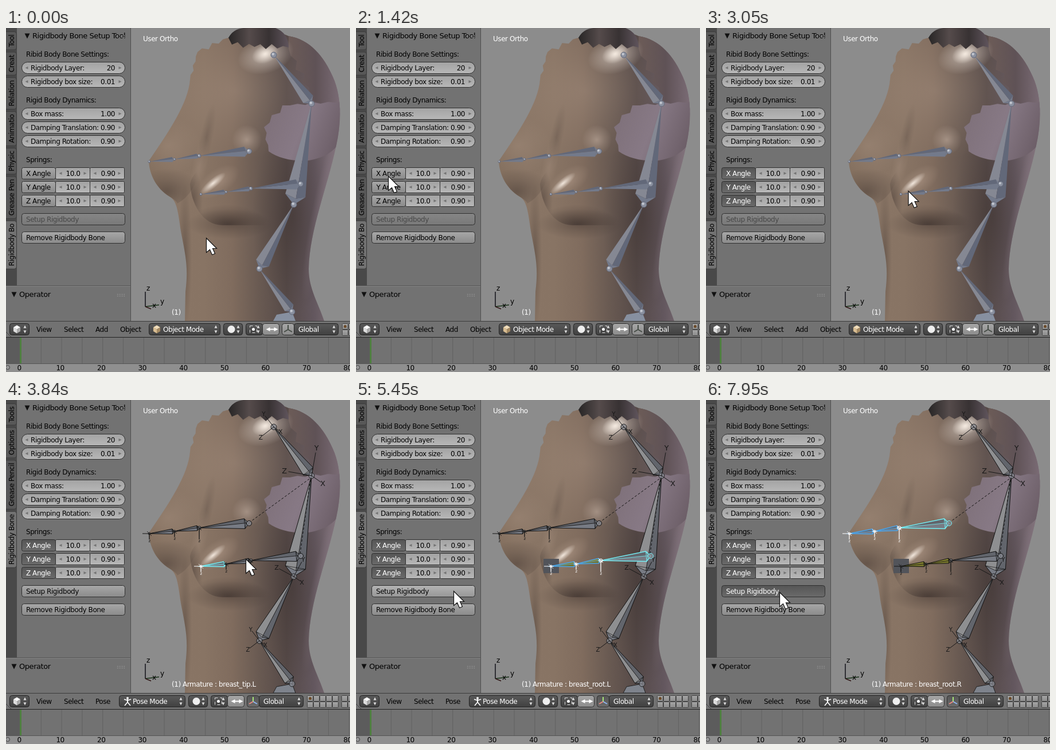
An HTML page with a canvas for the animation above (8 s loop, 600 px wide and 600 px high).

```html
<!DOCTYPE html>
<html>
<head>
<meta charset="utf-8">
<style>
html, body { margin: 0; width: 100%; height: 100%; overflow: hidden; background: #727272; }
canvas { display: block; }
</style>
</head>
<body>
<canvas id="stage" width="600" height="600"></canvas>
<script>
const ctx = document.getElementById('stage').getContext('2d');
const LOOP = 8000, POSE_AT = 3360, PRESS_AT = 5300, SETUP_AT = 5450, PRESS_AGAIN_AT = 7950;

// pointer moves: start, end, x, y
const moves = [
  [375, 420, 349, 365], [605, 880, 115, 339], [880, 1420, 56, 258], [1640, 1780, 58, 280],
  [1870, 2000, 60, 301], [2495, 3230, 371, 283], [3600, 3840, 418, 277], [4155, 4330, 448, 276],
  [4715, 5040, 170, 333], [5500, 6040, 275, 224], [6325, 6500, 315, 218], [6835, 7010, 377, 220],
  [7425, 7750, 128, 335]
];

// each bone runs from a base joint back to a tip joint
const link = joints => joints.slice(1).map((base, i) => ({ tip: joints[i], base }));
const spine = link([[467, 47], [533, 132], [502, 308], [442, 420], [499, 495]]);
const chain = [[250, 233], [294, 229], [337, 223], [424, 215]];
const parts = ['tip', 'mid', 'root'];
const chest = [['R', 0, 0], ['L', 90, 57]].flatMap(([side, dx, dy]) =>
  link(chain.map(([x, y]) => [x + dx, y + dy])).map((b, i) => ({ ...b, part: parts[i], name: `${parts[i]}.${side}` })));
const picks = [['L', 3560, 460], ['R', 6150, 545]].flatMap(([side, start, gap]) =>
  parts.map((part, i) => ({ at: start + i * gap, name: `${part}.${side}` })));

// jagged path segment
function torn(x0, y0, x1, y1, steps, depth) {
  const len = Math.hypot(x1 - x0, y1 - y0), nx = (y0 - y1) / len, ny = (x1 - x0) / len;
  let d = '';
  for (let i = 1; i < steps; i++) {
    const k = i / steps, off = depth * (i % 2 ? 1 : -1) * (.7 + .3 * Math.sin(i * 5));
    d += `L${x0 + (x1 - x0) * k + nx * off} ${y0 + (y1 - y0) * k + ny * off}`;
  }
  return d + `L${x1} ${y1}`;
}
const body = new Path2D(`M388 17${torn(388, 17, 334, 42, 6, 4)}${torn(334, 42, 321, 90, 6, 2)}` +
  'C318 130 285 180 249 232C250 255 262 280 285 294C300 302 300 325 306 360C314 400 318 420 313 460' +
  'L312 511H555C545 480 528 455 528 420C530 350 560 280 576 205C585 165 586 120 570 85C555 50 530 20 493 14' +
  'C455 -2 420 -2 388 17Z');
const back = new Path2D(`M493 0V36${torn(493, 36, 538, 128, 8, 6)}L600 150V0Z`);
const shoulder = new Path2D(`M482 135${torn(482, 135, 588, 128, 8, 2)}L578 205Q560 228 520 232` +
  `Q480 231 458 215${torn(458, 215, 450, 173, 4, 3)}${torn(450, 173, 482, 135, 4, 6)}Z`);
const collar = new Path2D(`M388 17Q396 2 414 0H470Q492 8 493 34${torn(493, 34, 394, 29, 10, 5)}Z`);
const farBreast = new Path2D('M322 104C308 140 285 180 249 232C250 255 262 280 285 294Q296 300 299 306Q330 290 342 235Z');
const nearBreast = new Path2D('M364 224Q325 250 321 272C323 305 342 344 378 344H470V190Z');

function text(s, x, y, { color = '#000', size = 12, align = 'left' } = {}) {
  ctx.font = `${size}px "DejaVu Sans", sans-serif`;
  ctx.letterSpacing = '-0.45px';
  ctx.textAlign = align;
  ctx.fillStyle = color;
  ctx.fillText(s, x, y);
}
function rect(x, y, w, h, color) {
  ctx.fillStyle = color;
  ctx.fillRect(x, y, w, h);
}
function poly(points, fill, stroke, width = 1) {
  ctx.beginPath();
  points.forEach(p => ctx.lineTo(...p));
  ctx.closePath();
  if (fill) { ctx.fillStyle = fill; ctx.fill(); }
  if (stroke) { ctx.strokeStyle = stroke; ctx.lineWidth = width; ctx.stroke(); }
}
// triangle pointing along +x (dir 0), +y (1), -x (2) or -y (3)
function triangle(x, y, r, dir, color) {
  const a = dir * Math.PI / 2, c = Math.cos(a), s = Math.sin(a);
  poly([[r, 0], [-r, r], [-r, -r]].map(([u, v]) => [x + u * c - v * s, y + u * s + v * c]), color);
}
function line(x1, y1, x2, y2, color = '#111', width = 1) {
  ctx.strokeStyle = color;
  ctx.lineWidth = width;
  ctx.beginPath();
  ctx.moveTo(x1, y1);
  ctx.lineTo(x2, y2);
  ctx.stroke();
}
function disc(x, y, r, fill, stroke) {
  ctx.beginPath();
  ctx.arc(x, y, r, 0, 7);
  ctx.fillStyle = fill;
  ctx.fill();
  if (stroke) { ctx.strokeStyle = stroke; ctx.lineWidth = 1; ctx.stroke(); }
}
function shade(x0, y0, x1, y1, ...colors) {
  const g = ctx.createLinearGradient(x0, y0, x1, y1);
  colors.forEach((c, i) => g.addColorStop(i / (colors.length - 1), c));
  return g;
}
const RAISED = ['#a8a8a8', '#8a8a8a'], HOVER = ['#b4b4b4', '#969696'], PRESSED = ['#555', '#6b6b6b'],
  DISABLED = ['#868686', '#787878'], NUMBER = ['#a2a2a2', '#b8b8b8'], MENU = ['#5a5a5a', '#404040'];
function box(x, y, w, h, r, [top, bottom], edge = '#303030') {
  ctx.beginPath();
  ctx.roundRect(x + .5, y + .5, w - 1, h - 1, r);
  ctx.fillStyle = shade(0, y, 0, y + h, top, bottom);
  ctx.fill();
  ctx.strokeStyle = edge;
  ctx.lineWidth = 1;
  ctx.stroke();
}
// soft elliptical tint, colour given as "r,g,b"
function glow(x, y, rx, ry, rgb, alpha, turn = 0) {
  ctx.save();
  ctx.translate(x, y);
  ctx.rotate(turn);
  ctx.scale(rx, ry);
  const g = ctx.createRadialGradient(0, 0, 0, 0, 0, 1);
  [1, .45, 0].forEach((k, i) => g.addColorStop(i / 2, `rgba(${rgb},${alpha * k})`));
  ctx.fillStyle = g;
  ctx.fillRect(-1, -1, 2, 2);
  ctx.restore();
}
function clipped(path, draw) {
  ctx.save();
  ctx.clip(path);
  draw();
  ctx.restore();
}

function drawTorso() {
  const dark = '52,42,39', light = '178,155,138', white = '250,240,230';
  clipped(body, () => {
    rect(218, 0, 382, 511, shade(250, 0, 585, 0, '#84705f', '#897565', '#887464', '#806c5e',
      '#695a52', '#564a48', '#63575e', '#84757e'));
    glow(400, 110, 150, 120, light, .35);
    glow(500, 330, 70, 170, dark, .4);
    glow(553, 320, 20, 160, '150,133,145', .5, .2);
    glow(312, 400, 12, 130, dark, .35);
    glow(350, 190, 11, 60, dark, .2, .2);
    glow(338, 240, 13, 50, light, .3, .2);
    clipped(farBreast, () => {
      glow(283, 205, 60, 50, light, .3);
      glow(280, 285, 60, 40, dark, .4);
    });
    glow(390, 342, 75, 26, dark, .4);
    clipped(nearBreast, () => {
      glow(325, 300, 18, 55, dark, .4);
      glow(385, 342, 70, 34, dark, .5);
      glow(370, 268, 42, 22, light, .6, -.6);
      glow(361, 271, 28, 8, white, .9, -.7);
    });
    glow(420, 195, 26, 26, '215,195,180', .45);
    ctx.fillStyle = shade(495, 0, 585, 0, '#6b5b57', '#5f5256', '#7c6d77');
    ctx.fill(back);
    glow(453, 47, 50, 32, white, .6, -.3);
    glow(452, 45, 24, 16, white, .9, -.4);
    ctx.fillStyle = shade(450, 150, 580, 200, '#7e7079', '#877985', '#6c5e67');
    ctx.fill(shoulder);
  });
  ctx.fillStyle = shade(390, 0, 493, 0, '#2a2828', '#554b4b', '#383233', '#5f545c');
  ctx.fill(collar);
}

function drawBone({ tip, base }, pose, edge, yellow) {
  const dx = tip[0] - base[0], dy = tip[1] - base[1];
  const at = (along, across) => [base[0] + dx * along - dy * across, base[1] + dy * along + dx * across];
  const left = at(.09, -.1), right = at(.09, .1), ridge = at(.06, .01);
  const steep = Math.abs(dy) > Math.abs(dx);
  const [lit, mid, low] = yellow ? ['#99983a', '#85842f', '#74732c']
    : pose ? ['#8e8f91', '#62656c', '#777b84'] : ['#858893', '#626879', '#737a8b'];
  poly([tip, left, ridge], steep ? lit : low);
  poly([tip, ridge, right], mid);
  poly([left, base, right, ridge], low);
  if (!pose) return;
  poly([tip, left, base, right], null, edge, edge === '#111' ? 1 : 1.5);
  line(...tip, ...ridge, edge, .8);
  poly([left, ridge, right], null, edge, .7);
}
function drawJoint([x, y], r, pose, edge = '#222') {
  disc(x, y, r, pose ? 'rgba(135,138,145,.75)' : '#8a909f', pose ? edge : '#626879');
  if (!pose) disc(x - r * .25, y - r * .3, r * .45, '#c1c5ce');
}
function drawAxes({ tip: [x, y], base }) {
  const dx = (x - base[0]) * .27, dy = (y - base[1]) * .27, len = Math.hypot(dx, dy);
  for (const [name, u, v] of [['Y', dx, dy], ['Z', dy, -dx], ['X', len * .4, len * .28]]) {
    line(x, y, x + u * .85, y + v * .85, '#181818');
    text(name, x + u, y + v + 4, { size: 7 + len * .12, align: 'center', color: '#181818' });
  }
}
function dashed(x1, y1, x2, y2) {
  ctx.setLineDash([4, 3]);
  line(x1, y1, x2, y2);
  ctx.setLineDash([]);
}

function drawArmature(t, pose) {
  const done = picks.filter(p => p.at <= t).map(p => p.name);
  const active = done.at(-1) || 'tip.R';
  const selected = done.filter(n => n.at(-1) === active.at(-1));
  const rigged = t >= SETUP_AT, last = spine.at(-1).base;

  poly([[466, 511], [472, 500], last, [505, 511]], pose ? '#7e838c' : '#8790a0', pose && '#222');
  spine.forEach(b => drawBone(b, pose, '#111'));
  spine.forEach(b => drawJoint(b.tip, 5, pose));
  drawJoint(last, 5, pose);
  if (pose) {
    dashed(424, 214, 530, 137);
    dashed(513, 268, 531, 138);
    spine.forEach(drawAxes);
    if (rigged) rect(327, 277, 27, 25, '#52545a');
  }
  for (const bone of chest) {
    const { tip: [x, y], name, part } = bone, root = part === 'root', chosen = selected.includes(name);
    const edge = !chosen ? '#111' : name === active ? '#74eef4' : '#4aa5ec';
    drawBone(bone, pose, edge, rigged && !root && name.endsWith('L'));
    if (root) drawJoint(bone.base, 4.5, pose, edge);
    drawJoint([x, y], root ? 3 : 2, pose, chosen ? '#fff' : '#222');
    if (!pose) continue;
    const color = chosen ? '#fff' : '#151515', drop = root ? 20 : 10;
    line(x, y, x, y + drop, color, 1.3);
    line(x - (part === 'tip' ? 12 : 4), y, x + 5, y, color);
    line(x - 4, y - 4, x + 4, y + 4, color, .8);
    text('z', x, y + drop + 5, { size: 7, align: 'center', color });
  }
  text(pose ? `(1) Armature : breast_${active}` : '(1)', 289, 500, { color: '#fff' });
}

function drawView(t, pose) {
  rect(217, 0, 383, 511, '#8c8c8c');
  drawTorso();
  drawArmature(t, pose);
  text('User Ortho', 239, 23, { color: '#fff' });
  for (const [name, dx, dy, color] of [['z', 0, -26, '#101018'], ['y', 24, -3, '#183018'], ['x', 10, 4, '#301515']]) {
    line(243, 486, 243 + dx, 486 + dy, color, 1.5);
    text(name, 245 + dx, 484 + dy);
  }
}

function drawTabs(pose) {
  rect(0, 0, 19, 450, '#494949');
  const tabs = pose ? ['Tools', 'Options', 'Grease Pencil', 'Rigidbody Bone']
    : ['Tool', 'Creat', 'Relation', 'Animatio', 'Physic', 'Grease Pen', 'Rigidbody Bo'];
  let top = 6;
  for (const name of tabs) {
    const fill = name.startsWith('Rigid') ? '#727272' : '#585858';
    const height = ctx.measureText(name).width + 11;
    box(-4, top, 23, height, 4, [fill, fill], '#3a3a3a');
    ctx.save();
    ctx.translate(14, top + height / 2);
    ctx.rotate(-Math.PI / 2);
    text(name, 0, 0, { align: 'center' });
    ctx.restore();
    top += height + 3;
  }
}
function numberBox(x, y, w, r) {
  box(x, y, w, 21, r, NUMBER);
  triangle(x + 9, y + 10.5, 2.5, 2, '#747474');
  triangle(x + w - 9, y + 10.5, 2.5, 0, '#747474');
}
function field(label, value, y) {
  numberBox(27, y, 181, 10);
  text(label, 43, y + 15);
  text(value, 190, y + 15, { align: 'right' });
}
function header(label, y) {
  triangle(y < 100 ? 37 : 14, y - 4, 4.5, 1, '#111');
  text(label, y < 100 ? 46 : 23, y, { size: 13 });
  for (let i = 0; i < 10; i++) rect(194 + (i % 5) * 3, y - 5 + (i > 4 ? 3 : 0), 1, 1, '#aaa');
}
function button(label, y, look, color) {
  box(27, y, 181, 21, 4, look);
  text(label, 35, y + 15, { color });
}
function drawPanel(t, pose) {
  rect(0, 0, 217, 511, '#727272');
  text('', 0, 0);
  drawTabs(pose);
  rect(217, 0, 1, 511, '#505050');
  header('Rigidbody Bone Setup Tool', 18);
  text('Ribid Body Bone Settings:', 35, 50);
  field('Rigidbody Layer:', '20', 59);
  field('Rigidbody box size:', '0.01', 83);
  text('Rigid Body Dynamics:', 35, 130);
  field('Box mass:', '1.00', 139);
  field('Damping Translation:', '0.90', 163);
  field('Damping Rotation:', '0.90', 187);
  text('Springs:', 35, 234);
  ['X', 'Y', 'Z'].forEach((name, i) => {
    const y = 243 + i * 24, on = t >= 1620 + i * 230;
    box(27, y, 60, 21, 3, on ? PRESSED : RAISED);
    text(`${name} Angle`, 56.5, y + 15, { align: 'center', color: on ? '#fff' : '#000' });
    ['10.0', '0.90'].forEach((value, col) => {
      numberBox(86 + col * 60, y, 61, 2);
      text(value, 117 + col * 61, y + 15, { align: 'center' });
    });
  });
  const pressed = t >= PRESS_AT && t < SETUP_AT || t >= PRESS_AGAIN_AT;
  const hover = t >= 5000 && t < 5600 || t >= 7900;
  button('Setup Rigidbody', 323, !pose ? DISABLED : pressed ? PRESSED : hover ? HOVER : RAISED,
    !pose ? '#474747' : pressed ? '#fff' : '#000');
  button('Remove Rigidbody Bone', 355, RAISED);
  line(0, 449.5, 217, 449.5, '#555');
  line(0, 450.5, 217, 450.5, '#858585');
  header('Operator', 469);
}

function menu(x, w, label = '', indent = 8) {
  box(x, 515, w, 21, 4, MENU, '#222');
  triangle(x + w - 8, 521, 2.5, 3, '#ddd');
  triangle(x + w - 8, 530, 2.5, 1, '#ddd');
  text(label, x + indent, 530, { color: '#fff' });
}
function cube(x, y, ...faces) {
  const corner = k => [x + 7 * Math.sin(k * Math.PI / 3), y - 7 * Math.cos(k * Math.PI / 3)];
  faces.forEach((color, i) => poly([[x, y], corner(i * 2 - 1), corner(i * 2), corner(i * 2 + 1)], color));
}
function drawHeader(pose) {
  rect(0, 511, 600, 29, '#727272');
  line(0, 511.5, 600, 511.5, '#3c3c3c');
  line(0, 539.5, 600, 539.5, '#222');
  line(0, 530, 9, 539, '#444');
  menu(6, 35);
  cube(19, 525.5, '#fff', '#aaa', '#ddd');
  text('View', 53, 530);
  text('Select', 101, 530);
  if (pose) {
    text('Pose', 156, 530);
    menu(197, 116, 'Pose Mode', 24);
    disc(212, 520, 2, '#fff');
    for (const s of [-1, 1]) {
      line(212, 524, 212 + s * 6, 522, '#fff', 1.6);
      line(212, 527, 212 + s * 5, 533, '#fff', 1.6);
    }
    line(212, 522, 212, 528, '#fff', 2);
  } else {
    text('Add', 156, 530);
    text('Object', 199, 530);
    menu(249, 125, 'Object Mode', 25);
    cube(263, 525.5, '#f1ddba', '#a58a63', '#d8bd92');
  }
  ctx.save();
  if (pose) ctx.translate(-61, 0);
  menu(379, 34);
  disc(393, 525.5, 6.5, '#eee');
  menu(418, 30);
  ctx.setLineDash([5, 4]);
  ctx.strokeStyle = '#ddd';
  ctx.strokeRect(425.5, 519.5, 12, 12);
  ctx.setLineDash([]);
  disc(431.5, 525.5, 2.5, '#fff');
  box(447, 515, 30, 21, 4, RAISED);
  line(458, 525.5, 470, 525.5, '#fff', 2);
  triangle(457, 525.5, 3.5, 2, '#fff');
  triangle(471, 525.5, 3.5, 0, '#fff');
  box(481, 515, 22, 21, 4, pose ? PRESSED : RAISED);
  ['#a8e878', '#8fb8f2', '#ed8a80'].forEach((color, i) => {
    const a = i * Math.PI * 2 / 3;
    line(492, 526, 492 + 8 * Math.sin(a), 526 - 8 * Math.cos(a), pose ? color : '#454c45', 2);
  });
  menu(502, 78, 'Global');
  for (let i = 0; i < 20; i++) {
    const x = 586 + (i % 10) * 11 - (i % 10 > 4 ? -5 : 0), y = 515 + (i > 9 ? 11 : 0);
    box(x, y, 11, 11, 1, RAISED, '#444');
    if (i === 0) disc(x + 5.5, y + 5.5, 2.5, '#6b4a28');
  }
  ctx.restore();
}
function drawTimeline() {
  rect(0, 540, 600, 45, '#727272');
  rect(0, 540, 25, 45, '#5c5c5c');
  for (let x = 25.5; x < 600; x += 35.8) line(x, 540, x, 585, '#626262');
  rect(0, 585, 600, 15, '#8f8f8f');
  line(0, 585.5, 600, 585.5, '#555');
  disc(3, 592, 3.5, '#999', '#444');
  for (let i = 0; i < 9; i++) text(String(i * 10), 23 + i * 71.6, 597, { align: 'center' });
  rect(24, 540, 3, 45, '#4f8040');
}

function drawPointer(t) {
  let x = 349, y = 366;
  for (const [start, end, toX, toY] of moves) {
    const k = Math.min(1, Math.max(0, (t - start) / (end - start))), eased = k * (2 - k);
    x += (toX - x) * eased;
    y += (toY - y) * eased;
  }
  ctx.save();
  ctx.translate(x + .5, y + .5);
  poly([[0, 0], [0, 25], [6, 20], [10, 29], [15, 27], [11, 18], [18, 18]], '#fff', '#111', 1.2);
  ctx.restore();
}

function frame() {
  const t = performance.now() % LOOP, pose = t >= POSE_AT;
  drawView(t, pose);
  drawPanel(t, pose);
  drawHeader(pose);
  drawTimeline();
  drawPointer(t);
  requestAnimationFrame(frame);
}
frame();
</script>
</body>
</html>
```
